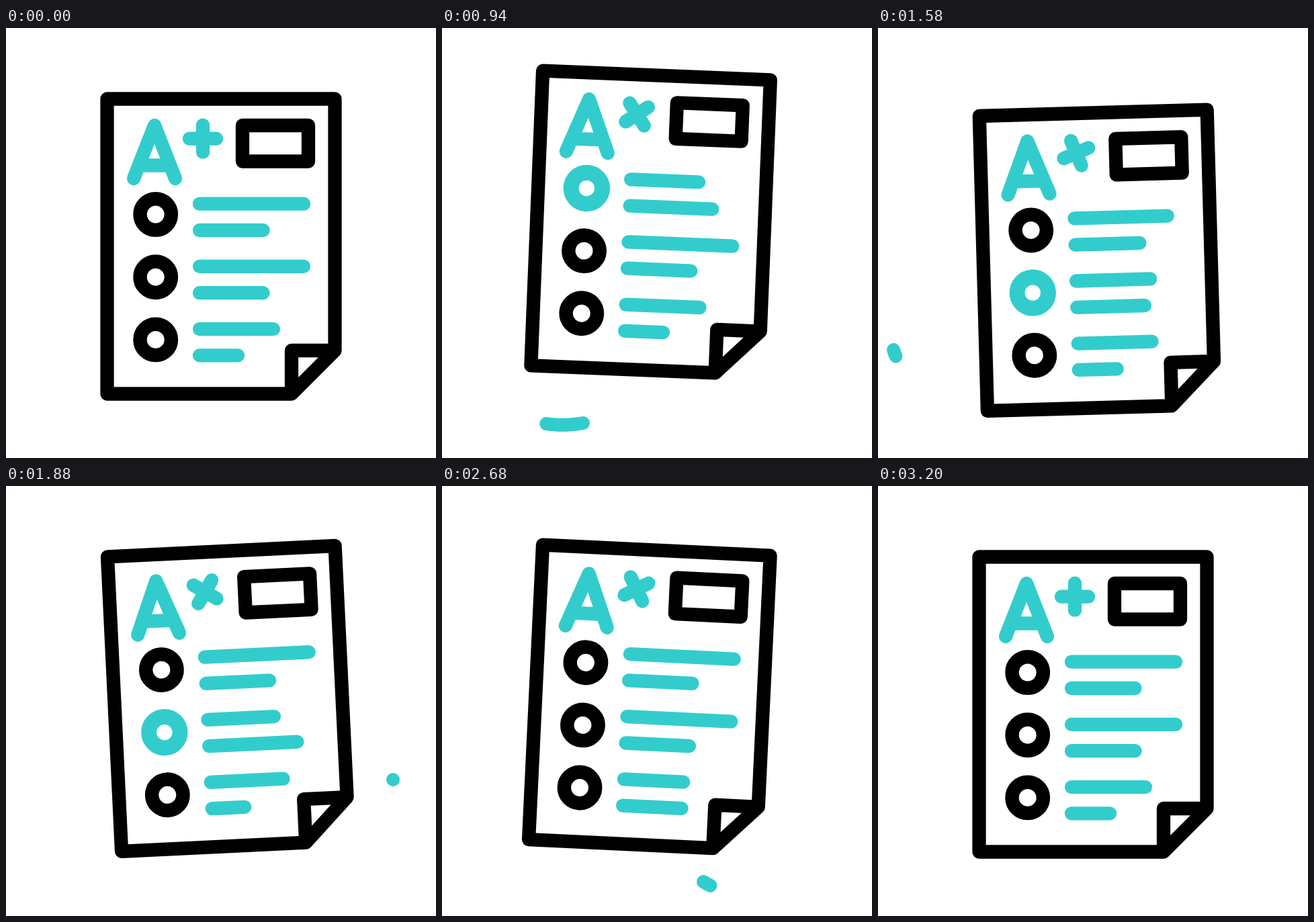
An HTML page with a canvas that plays this animation: 640x640 px, repeating every 3.56 s.

```html
<!DOCTYPE html>
<html lang="en">
<head>
<meta charset="utf-8">
<title>Graded test</title>
<style>
  html, body { margin: 0; width: 100%; height: 100%; overflow: hidden; background: #fff; }
  canvas { display: block; width: 640px; height: 640px; }
</style>
</head>
<body>
<canvas id="stage" width="640" height="640"></canvas>
<script>
const LOOP = 3560, START = 200, REST = 3200;
const TEAL = '#33cccc', INK = '#000', RAD = Math.PI / 180;
const ctx = document.getElementById('stage').getContext('2d');
ctx.lineCap = ctx.lineJoin = 'round';

// Smooth 0..1 between two times
function ease(t, from, to) {
  const x = Math.min(1, Math.max(0, (t - from) / (to - from)));
  return x * x * (3 - 2 * x);
}

// Eased path through [time, value] keys, beginning at zero
function track(t, begin, ...keys) {
  let value = 0, from = begin;
  let last = 0;
  for (const [to, next] of keys) {
    value += (next - last) * ease(t, from, to);
    [from, last] = [to, next];
  }
  return value;
}

const lift = t => track(t, START, [900, -42.5], [1580, 25.5], [2300, -42.5], [2990, 0]);
const tilt = t => track(t, 500, [1140, 3], [1785, -3], [2565, 3], [REST, 0]);

function paint(path, color = TEAL, width = 20.3) {
  ctx.strokeStyle = color;
  ctx.lineWidth = width;
  ctx.stroke(path instanceof Path2D ? path : new Path2D(path));
}

function ring(y, color, width, from = 0, to = 1) {
  const path = new Path2D(), angle = f => (360 * f - 90) * RAD;
  path.arc(222.7, y, 23.2, angle(from), angle(to));
  paint(path, color, width);
}

// Part of a cubic curve: the head runs ahead, the tail follows
function swoosh(t, begin, [a, b, c, d]) {
  const head = ease(t, begin, begin + 506);
  const tail = ease(t, begin + 352, begin + 858);
  if (head <= tail) return;
  const path = new Path2D(), steps = 40;
  for (let i = 0; i <= steps; i++) {
    const u = tail + (head - tail) * i / steps, v = 1 - u;
    const at = k => v * v * v * a[k] + 3 * v * v * u * b[k] + 3 * v * u * u * c[k] + u * u * u * d[k];
    path.lineTo(at(0), at(1));
  }
  paint(path, TEAL, 20);
}

// Each question repeats the one above it, a little later
function question(t, i) {
  const y = 277.5 + 93.2 * i;
  const [long, short] = i < 2 ? [155, 94.5] : [110, 57];

  ring(y, INK, 20.5);
  const mark = 600 + 700 * i;
  const drawn = ease(t, mark, mark + 290), erased = ease(t, mark + 580, mark + 680);
  if (drawn > erased) ring(y, TEAL, 23, erased, drawn);

  const begin = 235 + 770 * i;
  const half = Math.min(820, (REST - 80 - begin) / 2);
  const shrink = track(t, begin, [begin + half, (60 - long) * 0.6], [begin + 2 * half, 0]);
  const swing = track(t, begin, [begin + 300, -29], [begin + 830, 24 + short / 7], [begin + 1410, 0]);
  paint(`M288 ${y - 15.8}h${long + shrink}`);
  paint(`M288 ${y + 23.5}h${short + swing}`);
}

function draw(t) {
  ctx.fillStyle = '#fff';
  ctx.fillRect(0, 0, 640, 640);
  swoosh(t, 785, [[210, 588], [128, 603], [48, 556], [23, 479]]);
  swoosh(t, 1880, [[576, 437], [600, 538], [488, 649], [389, 589]]);

  ctx.save();
  ctx.translate(150.5, 95 + lift(t));
  ctx.rotate(tilt(t) * RAD);
  ctx.translate(-150.5, -95);

  paint('M150.5 105.5H489.5V480L425 544.5H150.5ZM425 544.5V480H489.5', INK);
  paint('M352 145H450V198.5H352Z', INK);
  paint('M190 224L221 145L252 224M198 204.5H244');
  for (let i = 0; i < 3; i++) question(t, i);

  ctx.translate(293, 164.7);
  ctx.rotate(360 * ease(t, START, REST) * RAD);
  paint('M-20 0H20M0 -20V20');
  ctx.restore();
}

const begin = performance.now();
function tick() {
  draw((performance.now() - begin) % LOOP);
  requestAnimationFrame(tick);
}
tick();
</script>
</body>
</html>
```
